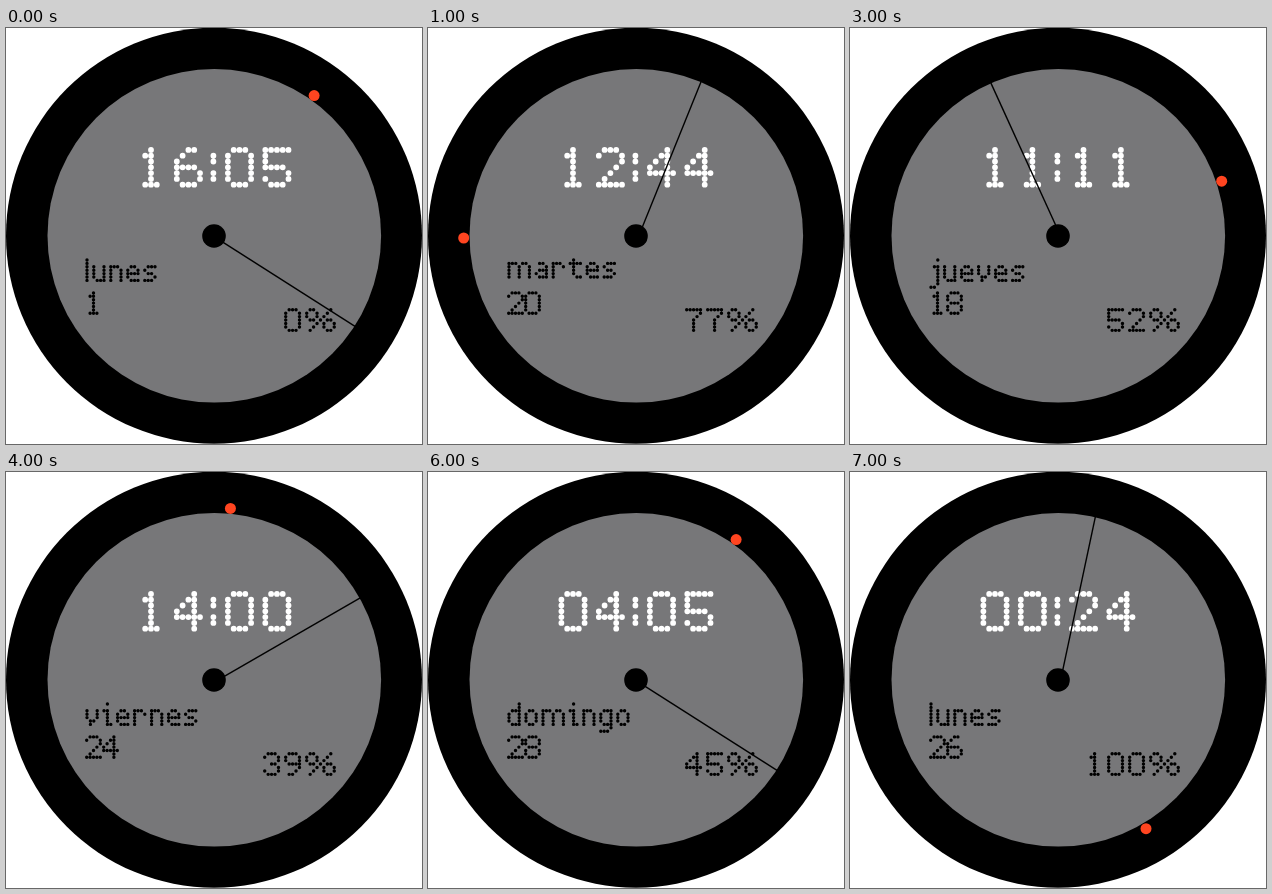
An HTML page with a canvas for the animation above (8 s loop, 416 px wide and 416 px high).

```html
<!DOCTYPE html>
<html lang="es">
<head>
<meta charset="utf-8">
<style>
  html, body { margin: 0; width: 100%; height: 100%; overflow: hidden; background: #fff; }
  canvas { display: block; width: 416px; height: 416px; }
</style>
</head>
<body>
<canvas id="stage" width="416" height="416"></canvas>
<script>
const ctx = document.getElementById('stage').getContext('2d');
const TAU = Math.PI * 2;
const GRAY = '#777779', RED = '#ff4520';

// Dot-matrix font: every glyph is a list of [column, row] built from strokes.
const TOP = 0, XTOP = 2, MID = 3, BASE = 6;

function line(x0, y0, x1, y1) {
  const steps = Math.max(Math.abs(x1 - x0), Math.abs(y1 - y0));
  return Array.from({ length: steps + 1 }, (_, i) => {
    const k = steps ? i / steps : 0;
    return [x0 + (x1 - x0) * k, y0 + (y1 - y0) * k];
  });
}
const stem = (x, top = XTOP, bottom = BASE) => line(x, top, x, bottom);
const bar = (y, left = 0, right = 3) => line(left, y, right, y);
const dot = (x, y) => [[x, y]];
const ring = (left, top, right, bottom) => [
  ...bar(top, left + 1, right - 1), ...bar(bottom, left + 1, right - 1),
  ...stem(left, top + 1, bottom - 1), ...stem(right, top + 1, bottom - 1)
];
const turn = (dots, width, height) => dots.map(([x, y]) => [width - x, height - y]);
const keep = (dots, test) => dots.filter(([x, y]) => test(x, y));

function buildDigits() {
  const loop = ring(0, MID, 4, BASE);
  const six = [...loop, ...line(0, 2, 2, TOP), ...dot(3, TOP), ...dot(0, MID)];
  const eight = [...ring(0, TOP, 4, MID), ...loop];
  const three = keep(eight, (x, y) => x > 1 || Math.abs(y - MID) > 1);
  return [
    ring(0, TOP, 4, BASE),
    [...stem(2, TOP), ...dot(1, 1), ...bar(BASE, 1)],
    [...keep(eight, (x, y) => y < 2), ...line(4, 2, 0, BASE), ...bar(BASE, 0, 4)],
    three,
    [...stem(3, TOP), ...line(3, TOP, 0, MID), ...bar(4, 0, 4)],
    [...bar(TOP, 0, 4), ...stem(0, TOP, MID), ...bar(MID), ...keep(three, (x, y) => y > MID)],
    six,
    [...bar(TOP, 0, 4), ...line(4, 1, 2, MID), ...stem(2, MID)],
    eight,
    turn(six, 4, BASE)
  ];
}

function buildLetters() {
  const bowl = ring(0, XTOP, 3, BASE);
  const arch = [...bar(XTOP, 1, 2), ...stem(3, MID)];
  const n = [...stem(0), ...arch];
  return {
    a: [...arch, ...bar(4, 1), ...dot(0, 5), ...bar(BASE, 1)],
    b: [...bowl, ...stem(0, TOP)],
    c: [...bar(XTOP, 1), ...stem(0, MID, 5), ...bar(BASE, 1)],
    d: [...bowl, ...stem(3, TOP)],
    e: [...keep(bowl, (x, y) => x < 3 || y < 5), ...bar(4), ...dot(3, BASE)],
    g: [...bowl, ...stem(3, XTOP, 7), ...bar(8, 0, 2)],
    i: [...dot(1, TOP), ...dot(0, XTOP), ...stem(1), ...dot(2, BASE)],
    j: [...dot(2, TOP), ...dot(1, XTOP), ...stem(2, XTOP, 7), ...bar(8, 0, 1)],
    l: stem(0, TOP),
    m: [...n, ...bar(XTOP, 4, 5), ...stem(6, MID)],
    n,
    o: bowl,
    r: [...stem(0), ...bar(XTOP, 1, 2), ...dot(3, MID)],
    s: [...bar(XTOP, 1), ...dot(0, MID), ...bar(4, 1, 2), ...dot(3, 5), ...bar(BASE, 0, 2)],
    t: [...stem(1, 1, 5), ...bar(XTOP), ...bar(BASE, 2)],
    u: turn(n, 3, XTOP + BASE),
    v: [...stem(0, XTOP, 4), ...stem(1, 5), ...dot(2, 5), ...stem(3, XTOP, 4)]
  };
}

const FONT = {
  ...buildDigits(),
  ...buildLetters(),
  ':': [...stem(0, 1, 2), ...stem(0, 4, 5)],
  '%': [...ring(0, TOP, 3, MID), ...line(7, TOP, 1, BASE), ...ring(5, MID, 8, BASE)]
};

const glyphWidth = char =>
  /\d/.test(char) ? 5 : Math.max(...FONT[char].map(([x]) => x)) + 1;

function disc(x, y, r, color) {
  ctx.fillStyle = color;
  ctx.beginPath();
  ctx.arc(x, y, r, 0, TAU);
  ctx.fill();
}

function dotText(text, x, y, pitch, gap, color) {
  ctx.fillStyle = color;
  ctx.beginPath();
  for (const char of text) {
    for (const [col, row] of FONT[char]) {
      const cx = x + (col + 0.5) * pitch, cy = y + (row + 0.5) * pitch;
      ctx.moveTo(cx + pitch / 2, cy);
      ctx.arc(cx, cy, pitch / 2, 0, TAU);
    }
    x += (glyphWidth(char) + gap) * pitch;
  }
  ctx.fill();
}

const WEEK = ['lunes', 'martes', 'miercoles', 'jueves', 'viernes', 'sabado', 'domingo'];

// Time, day of the month and battery level, one reading per second.
const READINGS = [
  '16:05 1 0', '12:44 20 77', '21:30 13 26', '11:11 18 52',
  '14:00 24 39', '21:00 15 64', '04:05 28 45', '00:24 26 100'
];

function drawHand(hours, minutes) {
  ctx.save();
  ctx.translate(209.5, 208.2);
  ctx.rotate((hours % 12 + minutes / 60) * TAU / 12);
  ctx.fillStyle = '#000';
  ctx.fillRect(0.4, -168, 1.4, 168);
  ctx.restore();
}

function drawMinuteDot(minutes) {
  const angle = (minutes + 0.9) * TAU / 60;
  disc(208.2 + 172.5 * Math.sin(angle), 208.2 - 172.5 * Math.cos(angle), 5.5, RED);
}

function drawWatch(index) {
  const [time, date, battery] = READINGS[index].split(' ');
  const [hours, minutes] = time.split(':');
  const day = WEEK[index % WEEK.length];

  ctx.fillStyle = '#fff';
  ctx.fillRect(0, 0, 416, 416);
  disc(208, 207.7, 208, '#000');
  disc(208.3, 207.8, 166.8, GRAY);

  dotText(hours, 130.5, 119, 5.8, 1.45, '#fff');
  dotText(':', 204.5, 119, 5.8, 0, '#fff');
  dotText(minutes, 219, 119, 5.8, 1.45, '#fff');

  // The day name hangs from its tallest letter.
  const rise = /[bdijl]/.test(day) ? 0 : 3.4;
  dotText(day, 79.3, 230.3 - rise, 3.4, 1, '#000');
  dotText(date, 79, 263.2, 3.4, 0, '#000');

  dotText(battery, 299 - 21 * battery.length, 280, 3.44, 1.1, '#000');
  dotText('%', 299, 280, 3.44, 0, '#000');

  drawHand(+hours, +minutes);
  disc(208, 208, 11.8, '#000');
  drawMinuteDot(+minutes);
}

const start = performance.now();
function tick() {
  const seconds = (performance.now() - start) / 1000;
  drawWatch(Math.floor(seconds) % READINGS.length);
  requestAnimationFrame(tick);
}
tick();
</script>
</body>
</html>
```
